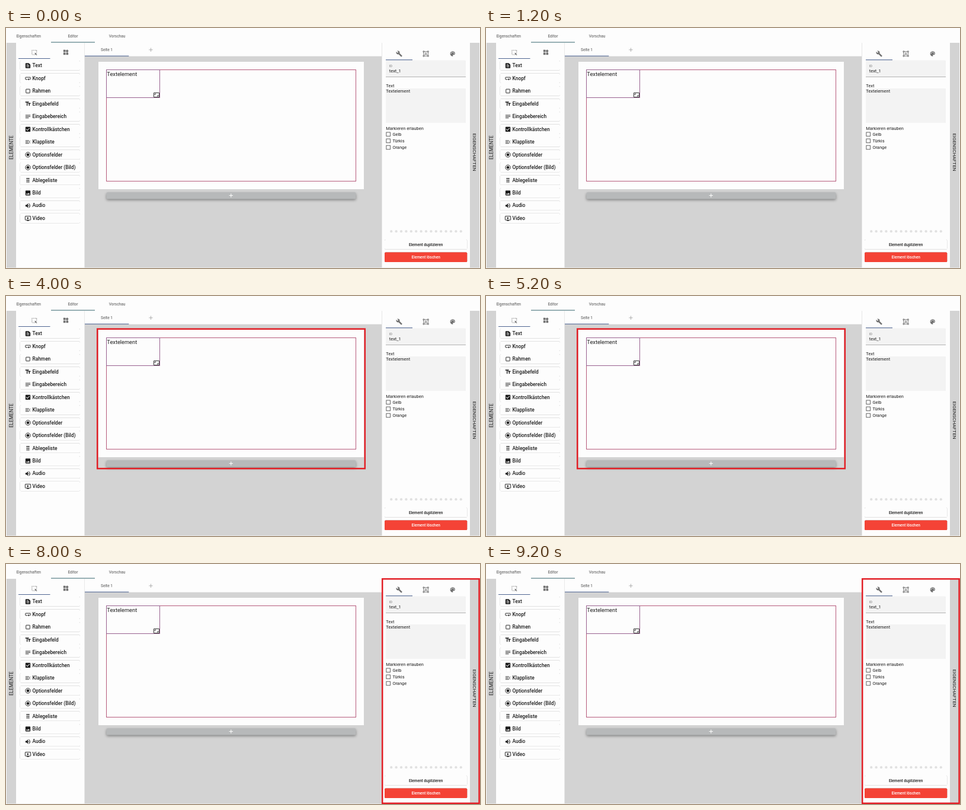
These frames come from a looping animation (800 px wide and 405 px high, 10000 ms). An HTML page:

```html
<!DOCTYPE html>
<html lang="de">
<head>
<meta charset="utf-8">
<title>Editor</title>
<style>
  html, body { margin: 0; width: 100%; height: 100%; overflow: hidden; background: #fdfdfd; }
  svg { display: block; width: 800px; height: 405px; font-family: Roboto, Arial, sans-serif; }
  .raised { filter: drop-shadow(0 .9px .7px rgba(0, 0, 0, .42)); }
  .bar { filter: drop-shadow(0 2px 2px rgba(0, 0, 0, .38)); }
</style>
</head>
<body>
<svg id="stage" viewBox="0 0 800 405" xmlns="http://www.w3.org/2000/svg"></svg>
<script>
const stage = document.getElementById('stage');
const PAPER = '#fdfdfd', GREY = '#d3d3d3', INK = '#1c1c1c', MUTED = '#707070';
const FIELD = '#f3f3f3', BLUE = '#4f6591';

function add(tag, attrs, text) {
  const node = document.createElementNS('http://www.w3.org/2000/svg', tag);
  for (const key in attrs) node.setAttribute(key, attrs[key]);
  if (text) node.textContent = text;
  return stage.appendChild(node);
}

const box = (x, y, width, height, fill, more) => add('rect', { x, y, width, height, fill, ...more });
const frame = (x, y, width, height, stroke, weight = 1) =>
  box(x, y, width, height, 'none', { stroke, 'stroke-width': weight });
const label = (text, x, y, size, more) =>
  add('text', { x, y, 'font-size': size, fill: INK, ...more }, text);
const tabLabel = (text, x, y) =>
  label(text, x, y, 6.5, { 'text-anchor': 'middle', 'font-weight': 500, fill: '#737373' });

// Icons live on a 24-unit grid: filled path, then optional stroked path.
const ICONS = {
  text: ['M5 3h10l6 6v10q0 2-2 2H5q-2 0-2-2V5q0-2 2-2zM7 7v2h7V7zM7 11v2h10v-2zM7 15v2h10v-2z'],
  button: ['M14.5 11l1.2 3.3L19 15.5l-3.3 1.2-1.2 3.3-1.2-3.3L10 15.5l3.3-1.2z',
    'M10 16H4q-1 0-1-1V9q0-1 1-1h16q1 0 1 1v6q0 1-1 1h-1'],
  frame: ['', 'M6 5h12q1 0 1 1v12q0 1-1 1H6q-1 0-1-1V6q0-1 1-1z'],
  letters: ['M2.5 4v3h5v12h3V7h5V4zM21.500 9h-9v3h3v7h3v-7h3z'],
  lines: ['', 'M3 7h18M3 12h18M3 17h12'],
  check: ['M5 3h14q2 0 2 2v14q0 2-2 2H5q-2 0-2-2V5q0-2 2-2zM10 17l9-9-1.400-1.400-7.600 7.600-3.600-3.600L5 12z'],
  list: ['', 'M3 7h13M3 12h10M3 17h13M20.300 7.700L16 12l4.300 4.300'],
  radio: ['M7 12a5 5 0 0 1 10 0a5 5 0 0 1-10 0z', 'M3 12a9 9 0 0 1 18 0a9 9 0 0 1-18 0z'],
  grip: ['M7 4h4v4H7zM13 4h4v4h-4zM7 10h4v4H7zM13 10h4v4h-4zM7 16h4v4H7zM13 16h4v4h-4z'],
  image: ['M5 3h14q2 0 2 2v14q0 2-2 2H5q-2 0-2-2V5q0-2 2-2zM8.500 13.500L5 18h14l-4.500-6-3.500 4.500z'],
  sound: ['M3 9v6h4l5 5V4L7 9zM14 8q2.500 1.300 2.500 4T14 16z', 'M14 4.300a8 8 0 0 1 0 15.400'],
  video: ['M9 7v8l7-4zM8 18h8v3H8z', 'M3 4h18q1 0 1 1v12q0 1-1 1H3q-1 0-1-1V5q0-1 1-1z'],
  select: ['M13 13l9 3-4 1.500 3.500 3.500-1.500 1.500-3.500-3.500L15 22z',
    'M3 6V4h2M8 4h3M14 4h3M19 4h1v3M3 9v3M3 15v3M20 9v3M4 20h2M9 20h3'],
  widgets: ['M3 3h8v8H3zM3 13h8v8H3zM13 13h8v8h-8zM16.700 1.700l5.600 5.600-5.600 5.700L11 7.300z'],
  wrench: ['M22.700 19l-9.100-9.100c.9-2.300.4-5-1.500-6.900-2-2-5-2.400-7.400-1.300L9 6 6 9 1.600 4.700C.4 7.100.9 10.100 2.900 12.100c1.900 1.900 4.600 2.400 6.900 1.500l9.100 9.100q.7.6 1.400 0l2.300-2.300q.7-.7.100-1.400z'],
  shapes: ['M11 7h2l4 10h-2l-.8-2.300H9.800L9 17H7zM10.400 13h3.200L12 8.600z',
    'M2 2h4v4H2zM18 2h4v4h-4zM2 18h4v4H2zM18 18h4v4h-4zM6 4h12M6 20h12M4 6v12M20 6v12'],
  palette: ['M12 3a9 9 0 0 0 0 18q1.500 0 1.500-1.500c0-1-.8-1-.8-2q0-1.500 1.500-1.500H16q5 0 5-5c0-4.400-4-8-9-8z' +
    [[6.5, 10.5], [9.5, 6.5], [14.5, 6.5], [17.5, 10.5]]
      .map(([x, y]) => `M${x - 1.5} ${y}a1.500 1.500 0 0 1 3 0a1.500 1.500 0 0 1-3 0z`).join('')],
  ratio: ['', 'M3 4h18q1 0 1 1v14q0 1-1 1H3q-1 0-1-1V5q0-1 1-1zM6 12V8h4M18 12v4h-4'],
};

function icon(name, x, y, color, size = 11.1) {
  const scale = size / 24;
  const transform = `translate(${x - size / 2} ${y - size / 2}) scale(${scale})`;
  const [solid, line] = ICONS[name];
  if (solid) add('path', { d: solid, transform, fill: color, 'fill-rule': 'evenodd' });
  if (line) add('path', { d: line, transform, fill: 'none', stroke: color, 'stroke-width': 2 });
}

function plus(x, y, r, stroke, weight) {
  add('path', { d: `M${x - r} ${y}h${2 * r}M${x} ${y - r}v${2 * r}`, stroke, 'stroke-width': weight });
}

function drawHeader() {
  box(1, 25, 798, 379.5, GREY);
  tabLabel('Eigenschaften', 38.2, 16);
  tabLabel('Editor', 113, 16);
  tabLabel('Vorschau', 187.5, 16);
  box(76, 23.5, 74, 1.1, '#47737b');
}

function drawElements() {
  label('ELEMENTE', 0, 0, 8.2, { transform: 'translate(12.2 201.7) rotate(-90)', 'text-anchor': 'middle' });
  box(17, 25, 115.5, 379.5, PAPER);
  icon('select', 48, 41.3, MUTED);
  icon('widgets', 101, 41, MUTED);
  box(21, 51, 53.5, 1, BLUE);
  const items = [
    ['Text', 'text'], ['Knopf', 'button'], ['Rahmen', 'frame'], ['Eingabefeld', 'letters'],
    ['Eingabebereich', 'lines'], ['Kontrollkästchen', 'check'], ['Klappliste', 'list'],
    ['Optionsfelder', 'radio'], ['Optionsfelder (Bild)', 'radio'], ['Ablegeliste', 'grip'],
    ['Bild', 'image'], ['Audio', 'sound'], ['Video', 'video'],
  ];
  items.forEach(([name, symbol], i) => {
    const y = 63.3 + i * 21.48;
    box(23.7, y - 8.2, 101.3, 16.4, PAPER, { rx: 1.9, class: 'raised' });
    icon(symbol, 37, y + .2, INK);
    label(name, 44.5, y + 2.9, 8.35, { 'font-weight': 500 });
  });
}

function drawPage() {
  box(133, 25, 501, 22.7, PAPER);
  tabLabel('Seite 1', 170, 38.9);
  plus(244.5, 36.8, 3.2, '#aaa', .9);
  box(133, 46.7, 74.3, 1.1, BLUE);
  box(156, 57, 448, 215, PAPER);
  frame(169.5, 70.5, 421, 188, '#b65a7b');
  frame(169.5, 70.5, 90, 47, '#98618f');
  label('Textelement', 170.3, 81, 9.28);
  icon('ratio', 254, 113, INK);
  box(169.5, 277.3, 421, 11.2, '#b7b9ba', { rx: 1.9, class: 'bar' });
  plus(379.8, 282.6, 3.2, '#fff', 1);
}

function drawProperties() {
  box(634.5, 25, 148.5, 379.5, PAPER);
  label('EIGENSCHAFTEN', 0, 0, 8.1, { transform: 'translate(788 209.7) rotate(90)', 'text-anchor': 'middle' });
  icon('wrench', 663.6, 43.5, MUTED);
  icon('shapes', 708.6, 43.5, MUTED);
  icon('palette', 753.8, 43.5, MUTED);
  box(641, 54.5, 135, 28, FIELD, { rx: 1 });
  box(641, 53.2, 45, 1.1, BLUE);
  box(641, 82, 135, .7, '#949494');
  label('ID', 646.8, 65.8, 5.57, { fill: '#777' });
  label('text_1', 646.8, 75, 7.43);
  label('Text', 641.3, 100, 7.43);
  box(641, 102, 135, 58, FIELD);
  label('Textelement', 641.3, 109, 7.43);
  label('Markieren erlauben', 641.3, 171.8, 7.43);
  ['Gelb', 'Türkis', 'Orange'].forEach((name, i) => {
    const y = 179.2 + i * 11.1;
    frame(641.9, y - 3.2, 6.6, 6.6, '#555', .9);
    label(name, 652.4, y + 2.6, 7.43);
  });
  for (let i = 0; i < 15; i++) add('circle', { cx: 650.2 + i * 8.4, cy: 343.2, r: 2.1, fill: '#e1e1e1' });
  const button = (text, y, fill, color) => {
    box(639, y - 8.4, 139.3, 16.7, fill, { rx: 1.9, class: 'raised' });
    label(text, 708.7, y + 2.3, 6.5, { 'text-anchor': 'middle', 'font-weight': 500, fill: color });
  };
  button('Element duplizieren', 365.3, PAPER, INK);
  button('Element löschen', 386.8, '#f44336', '#fff');
}

drawHeader();
drawElements();
drawPage();
drawProperties();

const STEP = 2000;
const spots = [
  null,
  [74.8, 1.2, 77, 25.4],
  [154.2, 55.6, 451.6, 235.6],
  [1.2, 25.2, 130.6, 378.6],
  [635.2, 25.2, 163.4, 378.6],
];
const marker = frame(0, 0, 0, 0, '#e21f26', 2.5);

function render(time) {
  const spot = spots[Math.floor(time / STEP) % spots.length];
  marker.setAttribute('visibility', spot ? 'visible' : 'hidden');
  if (spot) ['x', 'y', 'width', 'height'].forEach((key, i) => marker.setAttribute(key, spot[i]));
}

const start = performance.now();
function tick() {
  render(performance.now() - start);
  requestAnimationFrame(tick);
}
tick();
</script>
</body>
</html>
```
